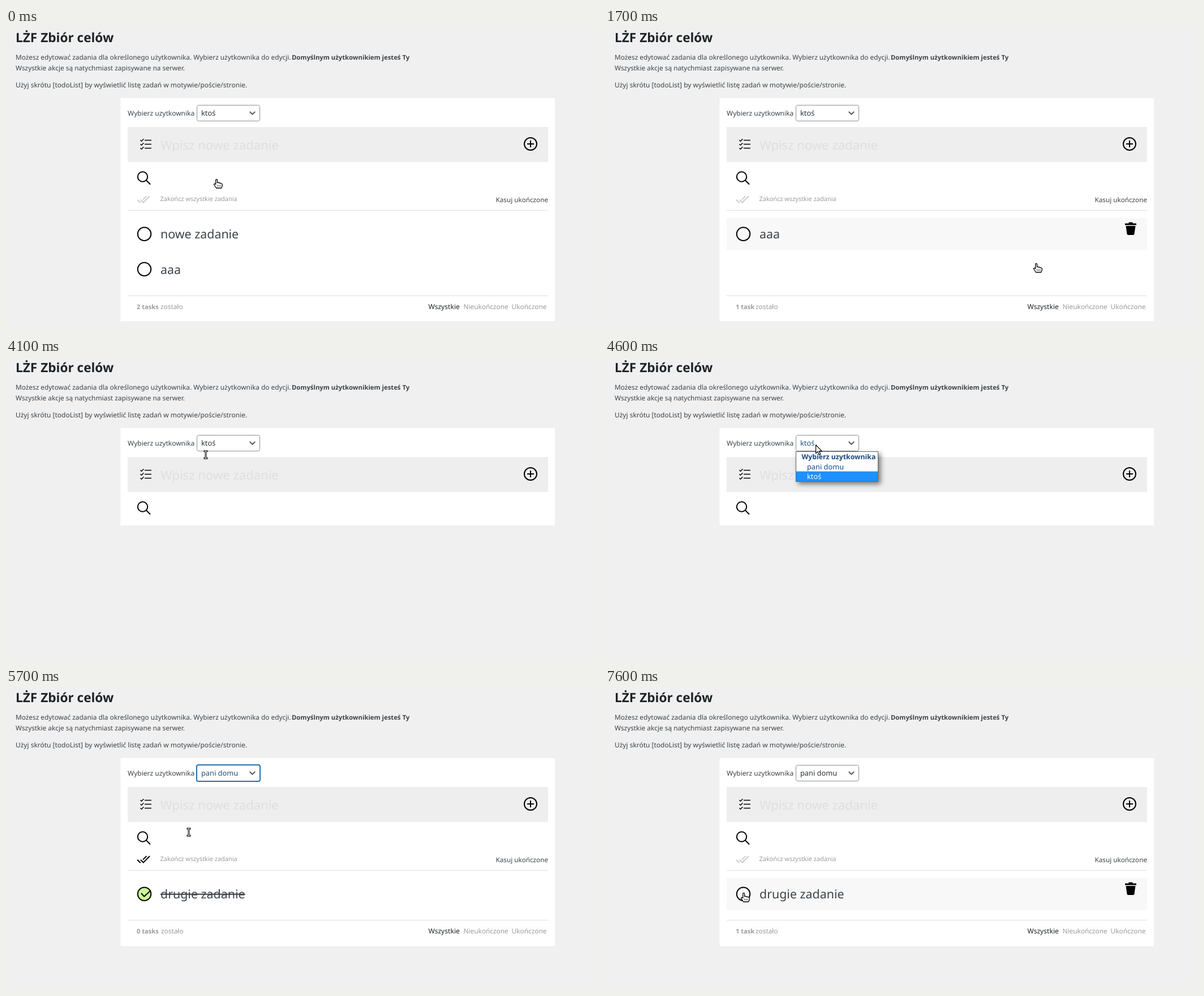
Animation of 1048 by 534 pixels, one loop 8 s. Source, as an HTML page:

```html
<!DOCTYPE html>
<html lang="pl">
<head>
<meta charset="utf-8">
<title>Lista</title>
<style>
html, body { margin: 0; width: 100%; height: 100%; overflow: hidden; background: #f0f0f0; }
svg { display: block; width: 1048px; height: 534px; }
text { font-family: "Noto Sans", "Open Sans", sans-serif; font-size: 11.85px; fill: #3c434a;
  text-rendering: geometricPrecision; white-space: pre; }
.b { font-weight: 700; }
.gray { fill: #9b9b9b; }
.task { font-size: 21.4px; }
.user { font-size: 12.8px; }
.ink { fill: none; stroke: #000; stroke-width: 2; }
.rule { fill: #dfdfdf; }
#menu { filter: drop-shadow(4px 4px 4px rgba(0, 0, 0, .5)); }
#menu text { fill: #174a7c; }
</style>
</head>
<body>
<svg viewBox="0 0 1048 534">
  <rect width="1048" height="534" fill="#f0f0f0"/>
  <text class="b" x="17" y="25" style="font-size:22.6px;fill:#1d2327">LŻF Zbiór celów</text>
  <text x="17" y="55.5">Możesz edytować zadania dla określonego użytkownika. Wybierz użytkownika do edycji.</text>
  <text class="b" x="505" y="55.5" style="font-size:11.3px">Domyślnym użytkownikiem jesteś Ty</text>
  <text x="17" y="75">Wszystkie akcje są natychmiast zapisywane na serwer.</text>
  <text x="17" y="105.3" style="font-size:11.97px">Użyj skrótu [todoList] by wyświetlić listę zadań w motywie/poście/stronie.</text>

  <rect id="panel" x="202.5" y="124" width="767.5" fill="#fff"/>
  <text x="215" y="155" style="font-size:12px">Wybierz uzytkownika</text>
  <rect id="box" fill="#fff"/>
  <path class="ink" d="M430.8 148l4.7 4.7l4.7-4.7" style="stroke:#50575e"/>
  <text id="user" class="user" x="345" y="155"/>

  <rect x="215" y="175" width="743" height="62" fill="#eee"/>
  <text x="273" y="214.5" style="font-size:22.1px;fill:#dfdfdf">Wpisz nowe zadanie</text>
  <g class="ink" style="stroke-width:1.5">
    <path d="M245 198.5h12M245 205.5h12M245 212.5h12"/>
    <path d="M237.5 198.2l2 2l3.8-4M237.5 205.2l2 2l3.8-4M237.5 212.2l2 2l3.8-4"/>
  </g>
  <g class="ink">
    <circle cx="927" cy="205" r="11"/>
    <path d="M921 205h12M927 199v12"/>
    <circle cx="241.5" cy="263" r="8.7"/>
    <path d="M247.8 269.3l7.2 7.2"/>
  </g>

  <g id="list">
    <path id="all" class="ink" transform="translate(231 291)" d="M1.1 12.7l5.6 5.6M6.8 12.7l4.9 4.9L23 6.3M17.3 6.3L11 12.6"/>
    <text class="gray" x="272.5" y="306" style="font-size:10.95px">Zakończ wszystkie zadania</text>
    <text x="958" y="307.5" text-anchor="end" style="font-size:11.7px">Kasuj ukończone</text>
    <rect class="rule" x="215" y="322" width="743" height="1"/>
    <g id="hover">
      <rect x="215" y="336" width="743" height="56" fill="#f8f8f8"/>
      <path d="M919 348.5v-3h6l1-2h6l1 2h6v3zM920.5 350h17l-2 14q-.3 2-2.3 2h-8.4q-2 0-2.3-2z"/>
    </g>
    <g id="rowA">
      <circle id="ring" class="ink" cx="244.5" cy="364.3" r="11.7"/>
      <path id="tick" class="ink" d="M239 363l5.2 5.6L256 358"/>
      <text id="taskA" class="task" x="273" y="372"/>
    </g>
    <g id="rowB">
      <circle class="ink" cx="244.5" cy="426.5" r="11.7"/>
      <text class="task" x="273" y="434.5">aaa</text>
    </g>
    <g id="foot">
      <rect class="rule" x="215" width="743" height="1"/>
      <text class="gray b" id="count" x="231" y="24" style="font-size:11.1px"/>
      <text class="gray" id="left" y="24">zostało</text>
      <text x="746.5" y="24" style="font-size:12.1px;fill:#1d2327">Wszystkie</text>
      <text class="gray" x="808.5" y="24">Nieukończone</text>
      <text class="gray" x="893.5" y="24">Ukończone</text>
    </g>
  </g>

  <g id="menu">
    <rect x="337.5" y="165.5" width="145" height="53" fill="#fff" stroke="#666"/>
    <rect id="pick" x="338" width="144" height="17.5" fill="#1e90ff"/>
    <text class="b" x="347.5" y="179" style="font-size:12.25px">Wybierz uzytkownika</text>
    <text id="opt0" class="user" x="357" y="196.5">pani domu</text>
    <text id="opt1" class="user" x="357" y="213.5">ktoś</text>
  </g>

  <g id="cursor" stroke-linejoin="round">
    <g id="hand">
      <path fill="#fff" stroke="#000" stroke-width="1.3" d="M-4.3 1.5V-6.2a1.4 1.4 0 0 1 2.8 0V-1.6q2.6-.5 3 .7q2.4-.4 2.9.7q2.6-.2 2.9 1.6V4L5.6 8H-3.4L-7.3 2q-.4-1.8 1.2-1.6z"/>
      <path fill="none" stroke="#000" stroke-width=".8" d="M-1.3 2.5v3M1.3 2.5v3M3.9 2.5v3"/>
    </g>
    <g id="beam" fill="none">
      <path stroke="#000" stroke-width="3" d="M-3.5-6.2h7M-3.5 6.2h7M0-6v12"/>
      <path stroke="#fff" stroke-width="1" d="M-2.5-6.2h5M-2.5 6.2h5M0-6v12"/>
    </g>
    <path id="arrow" fill="#fff" stroke="#000" stroke-width="1.2" d="M.6 .6V15.6L4 12.4L6.4 18.4L8.9 17.3L6.4 11.6H11.2Z"/>
  </g>
</svg>
<script>
const LOOP = 8000, STEP = 100;
const $ = id => document.getElementById(id);
const show = (id, on) => $(id).setAttribute('display', on ? 'inline' : 'none');
const set = (id, attrs) => { for (const k in attrs) $(id).setAttribute(k, attrs[k]); };
const write = (id, s) => { if ($(id).textContent !== s) $(id).textContent = s; };
const within = (t, ...spans) => spans.some(([a, b]) => t >= a && t < b);

// time, x, y, pointer kind
const path = [
  [0, 375, 275, 'hand'], [100, 246, 352, 'hand'], [200, 256, 428, 'hand'],
  [300, 256, 428, 'hand'], [600, 600, 410, 'hand'], [900, 922, 359, 'hand'],
  [1100, 922, 359, 'hand'], [1200, 922, 358, 'hand'], [1400, 922, 358, 'hand'],
  [1700, 765, 424, 'hand'], [2000, 450, 392, 'hand'], [2300, 287, 368, 'hand'],
  [2400, 610, 367, 'hand'], [2500, 889, 364, 'hand'], [2800, 889, 364, 'hand'],
  [2900, 930, 366, 'hand'], [3000, 952, 366, 'hand'], [3100, 930, 364, 'hand'],
  [3400, 930, 364, 'hand'], [3500, 925, 362, 'arrow'], [3800, 600, 275, 'beam'],
  [4100, 353, 171, 'beam'], [4200, 365, 157, 'arrow'], [4300, 372, 153, 'arrow'],
  [4600, 372, 153, 'arrow'], [4800, 382, 185, 'arrow'], [5200, 382, 185, 'arrow'],
  [5300, 382, 190, 'beam'], [5700, 323, 255, 'beam'], [5800, 300, 318, 'hand'],
  [6000, 262, 444, 'hand'], [6200, 246, 372, 'hand'], [6500, 246, 372, 'hand'],
  [6800, 300, 410, 'hand'], [7100, 272, 425, 'hand'], [7300, 234, 434, 'hand'],
  [7600, 248, 370, 'hand'], [8000, 248, 370, 'hand']
];

function pointer(t) {
  let i = 0;
  while (i < path.length - 2 && t >= path[i + 1][0]) i++;
  const [t0, x0, y0, kind] = path[i], [t1, x1, y1] = path[i + 1];
  const k = (t - t0) / (t1 - t0);
  return { x: x0 + (x1 - x0) * k, y: y0 + (y1 - y0) * k, kind };
}

function render(ms) {
  const t = Math.floor(ms % LOOP / STEP) * STEP;
  const two = t < 1500, second = t >= 5100;
  const tall = t < 1900, empty = within(t, [3500, 5200]);
  const done = within(t, [5200, 6400]);
  const open = within(t, [4400, 5100]), focus = within(t, [5100, 6400]);

  set('panel', { height: empty ? 172 : tall ? 394.5 : 332.5 });
  set('box', focus
    ? { x: 337, y: 136, width: 112, height: 29, rx: 3, stroke: '#2271b1', 'stroke-width': 2 }
    : { x: 337.5, y: 136.5, width: 111, height: 28, rx: 3, stroke: '#8c8f94', 'stroke-width': 1 });
  write('user', second ? 'pani domu' : 'ktoś');
  $('user').style.fill = focus || within(t, [4200, 5100]) ? '#20507c' : '#2c3338';

  show('list', !empty);
  show('rowB', two);
  write('taskA', second ? 'drugie zadanie' : two ? 'nowe zadanie' : 'aaa');
  $('taskA').style.textDecoration = done ? 'line-through' : 'none';
  $('ring').style.fill = done ? '#ccf794' : 'none';
  show('tick', done);
  $('all').style.stroke = done ? '#000' : '#ccc';
  const n = done ? 0 : two ? 2 : 1;
  write('count', n === 1 ? '1 task' : n + ' tasks');
  set('left', { x: [274, 266, 273][n] });
  set('foot', { transform: `translate(0 ${tall ? 473 : 410})` });

  const low = within(t, [200, 700]);
  show('hover', low || within(t, [100, 200], [700, 3500], [5900, 6000], [6100, 6700], [7500, 8000]));
  set('hover', { transform: `translate(0 ${low ? 62 : 0})` });

  show('menu', open);
  const top = t >= 4800;
  set('pick', { y: top ? 183.5 : 200.5 });
  $('opt0').style.fill = top ? '#fff' : '';
  $('opt1').style.fill = top ? '' : '#fff';

  const p = pointer(t);
  for (const kind of ['hand', 'beam', 'arrow']) show(kind, kind === p.kind);
  set('cursor', { transform: `translate(${Math.round(p.x)} ${Math.round(p.y)})` });
}

const start = performance.now();
function tick() {
  render(performance.now() - start);
  requestAnimationFrame(tick);
}
render(0);
requestAnimationFrame(tick);
</script>
</body>
</html>
```
